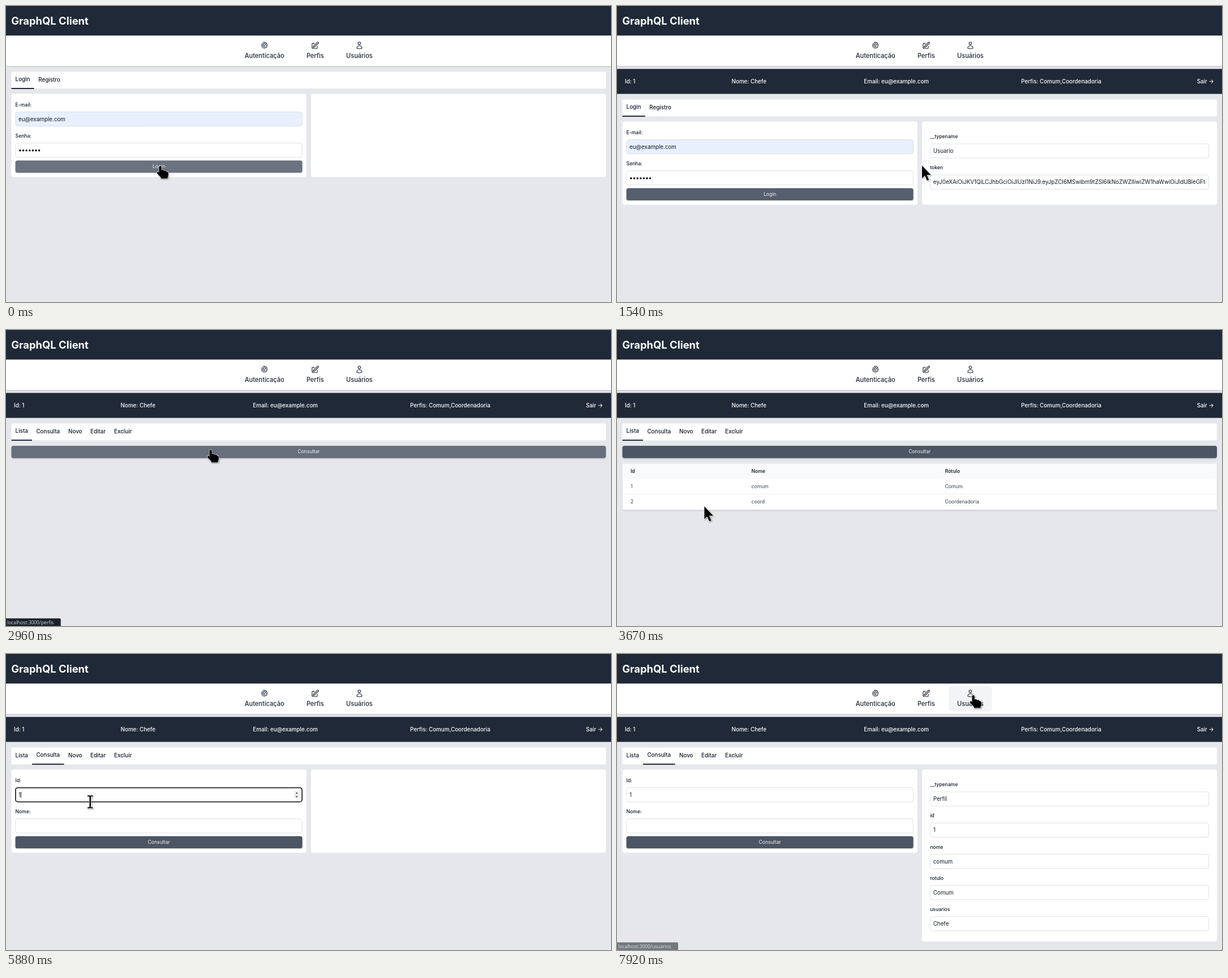
These frames come from a looping animation (1069x524 px, 8000 ms). An HTML page:

```html
<!DOCTYPE html>
<html lang="pt">
<head>
<meta charset="utf-8">
<style>
  html, body { margin: 0; width: 100%; height: 100%; overflow: hidden; background: #e5e7eb; }
  svg { display: block; width: 100%; height: 100%; }
  text { font-family: Inter, sans-serif; white-space: pre; }
  .shadow { filter: drop-shadow(0 1px 1.3px rgba(0, 0, 0, .2)); }
  .icon { fill: none; stroke: #1f2937; stroke-width: 1.9; stroke-linecap: round; stroke-linejoin: round; }
  .cursor { stroke: #fff; stroke-width: 1.4; stroke-linejoin: round; paint-order: stroke; filter: drop-shadow(1px 1.5px 1px rgba(0, 0, 0, .4)); }
</style>
</head>
<body>
<svg id="stage" viewBox="0 0 1069 524" preserveAspectRatio="none"></svg>
<script>
const LOOP = 8000, FPS = 24;
const SM = 8.58, BASE = 9.81, LG = 11.03, XL = 18.4;
const DARK = '#1f2937', INK = '#111827';
const EMAIL = 'eu@example.com', USER = 'Chefe', ROLE = 'Coordenadoria';
const TOKEN = 'eyJ0eXAiOiJKV1QiLCJhbGciOiJIUzI1NiJ9.eyJpZCI6MSwibm9tZSI6IkNoZWZlIiwiZW1haWwiOiJldUBleGFtcGxl';

const clamp = v => Math.max(0, Math.min(1, v));
const between = (t, a, b) => t >= a && t < b;
// Rises after a and falls after b, like a short CSS transition.
const fade = (t, a, b, d = 125) => clamp((t - a) / d) * (1 - clamp((t - b) / d));
const mix = (a, b, k) => `rgb(${a.map((v, i) => Math.round(v + (b[i] - v) * k))})`;

const rect = (x, y, w, h, fill, more = '') =>
  `<rect x="${x}" y="${y}" width="${w}" height="${h}" fill="${fill}" ${more}/>`;
const text = (x, y, s, size = BASE, fill = INK, weight = 400, anchor = 'start') =>
  `<text x="${x}" y="${y}" font-size="${size}" fill="${fill}" font-weight="${weight}" text-anchor="${anchor}">${s}</text>`;
const label = (x, y, s) => text(x, y, s, SM, INK, 500);
const panel = (x, h) => rect(x, 155.5, 521.3, h, '#fff', 'rx="3.7"');
const input = (x, y, w, value = '', fill = '#fff') =>
  rect(x, y, w, 25.2, fill, 'rx="3.7" stroke="#d1d5db" stroke-width=".7"') +
  `<svg x="${x + 5.3}" y="${y}" width="${w - 10.6}" height="25">${text(0, 16.3, value)}</svg>`;
const button = (x, y, w, s, hover) =>
  rect(x, y, w, 21.6, mix([75, 85, 99], [107, 114, 128], hover), 'rx="3.7" class="shadow"') +
  text(x + w / 2, y + 13.3, s, SM, '#f3f4f6', 400, 'middle');

const ICONS = [
  'M7.864 4.243A7.5 7.5 0 0 1 19.5 10.5c0 2.92-.556 5.709-1.568 8.268M5.742 6.364A7.465 7.465 0 0 0 4.5 10.5a7.464 7.464 0 0 1-1.15 3.993m1.989 3.559A11.209 11.209 0 0 0 8.25 10.5a3.75 3.75 0 1 1 7.5 0c0 .527-.021 1.049-.064 1.565M12 10.5a14.94 14.94 0 0 1-3.6 9.75m6.633-4.596a18.666 18.666 0 0 1-2.485 5.33',
  'M16.862 4.487l1.687-1.688a1.875 1.875 0 1 1 2.652 2.652L10.582 16.07a4.5 4.5 0 0 1-1.897 1.13L6 18l.8-2.685a4.5 4.5 0 0 1 1.13-1.897zM18 14v4.75A2.25 2.25 0 0 1 15.75 21H5.25A2.25 2.25 0 0 1 3 18.75V8.25A2.25 2.25 0 0 1 5.25 6H10',
  'M15.75 6a3.75 3.75 0 1 1-7.5 0 3.75 3.75 0 0 1 7.5 0ZM4.501 20.118a7.5 7.5 0 0 1 14.998 0A17.933 17.933 0 0 1 12 21.75c-2.676 0-5.216-.584-7.499-1.632Z'
];

function navItem(i, x, s, half, hover) {
  return rect(x - half, 57, half * 2, 44.2, '#f3f4f6', `rx="4.9" opacity="${hover}"`) +
    `<path class="icon" d="${ICONS[i]}" transform="translate(${x - 7.35} 62.4) scale(.613)"/>` +
    text(x, 92, s, LG, DARK, 500, 'middle');
}

function header(t) {
  return rect(0, 52, 1069, 54.3, '#fff', 'class="shadow"') + rect(0, 0, 1069, 52.3, DARK) +
    text(9.3, 33, 'GraphQL Client', XL, '#fff', 700) +
    navItem(0, 456.7, 'Autenticação', 50, 0) +
    navItem(1, 546.3, 'Perfis', 30.5, fade(t, 1830, 2800)) +
    navItem(2, 624.4, 'Usuários', 38.2, fade(t, 7740, LOOP));
}

function userBar() {
  const cells = [[14, 'Id: 1'], [202.6, 'Nome: ' + USER], [436.3, 'Email: ' + EMAIL],
    [714, 'Perfis: Comum,' + ROLE], [1024.7, 'Sair →']];
  return rect(0, 111.4, 1069, 44.2, DARK) +
    cells.map(([x, s]) => text(x, 136.7, s, BASE, '#fff', 500)).join('');
}

function tabs(items, active, x1, x2) {
  return rect(9.5, 116.5, 1050.5, 29.8, '#fff') + rect(x1, 145, x2 - x1, 2, DARK) +
    items.map(([x, s], i) => text(x, i === active ? 133.3 : 134.4, s, BASE, INK, 500)).join('');
}

function results(rows) {
  return rows.map(([name, value], i) =>
    label(553.2, 185.1 + i * 55.2, name) + input(553.4, 194.9 + i * 55.2, 492.2, value)).join('');
}

function form(first, second, fields, caption, hover) {
  return panel(9.5, 147.2) + label(16.6, 177.9, first) + label(16.6, 233.1, second) +
    fields + button(16.6, 273.4, 507, caption, hover);
}

function loginPage(t) {
  let dots = '';
  for (let i = 0; i < 7; i++) dots += `<circle cx="${24.9 + i * 5.62}" cy="255.8" r="1.75"/>`;
  const hover = t < 1200 ? 1 - clamp((t - 730) / 125) : fade(t, 1300, 1460);
  return tabs([[16.6, 'Login'], [57.2, 'Registro']], 0, 9.5, 49.6) +
    form('E-mail:', 'Senha:', input(16.8, 187.5, 506.6, EMAIL, '#e8f0fe') +
      input(16.8, 242.7, 506.6) + dots, 'Login', hover) +
    panel(538.8, 147.2) +
    (t >= 750 ? results([['__typename', 'Usuario'], ['token', TOKEN]]) : '');
}

const PROFILE_TABS = [[16.6, 'Lista'], [53.4, 'Consulta'], [110, 'Novo'], [149, 'Editar'], [191, 'Excluir']];

function table() {
  const cols = [24, 237.6, 579.4];
  const row = (y, cells, fill, weight) => cells.map((s, i) => text(cols[i], y, s, SM, fill, weight)).join('');
  return rect(9.5, 187.4, 1050.5, 82, '#fff', 'class="shadow"') +
    rect(9.5, 187.4, 1050.5, 27, '#f9fafb') + rect(9.5, 241.3, 1050.5, .7, '#e5e7eb') +
    row(203.6, ['Id', 'Nome', 'Rótulo'], DARK, 600) +
    row(230.9, ['1', 'comum', 'Comum'], '#374151') +
    row(258.1, ['2', 'coord', ROLE], '#374151');
}

function listPage(t) {
  return tabs(PROFILE_TABS, 0, 9.5, 46) +
    button(9.5, 156, 1050.5, 'Consultar', fade(t, 2850, 3300)) + (t >= 3200 ? table() : '');
}

function queryPage(t) {
  const typed = t >= 5400, done = t >= 6700;
  const focus = between(t, 4780, 6530) ?
    rect(16.9, 187.6, 506.2, 25, 'none', 'rx="3.9" stroke="#101010" stroke-width="1.6"') +
    rect(typed ? 26.1 : 22, 195, .8, 10.5, '#000') +
    rect(509, 193.5, 9.5, 13.5, '#efefef') +
    '<path d="M511.6 198.2l2.2-2.6 2.2 2.6zM511.6 202.6l2.2 2.6 2.2-2.6z" fill="#444"/>' : '';
  const fields = input(16.8, 187.5, 506.6, typed ? '1' : '') + input(16.8, 242.7, 506.6) + focus;
  return tabs(PROFILE_TABS, 1, 46, 102.6) +
    form('Id:', 'Nome:', fields, 'Consultar', fade(t, 6080, 7120)) +
    panel(538.8, done ? 304.3 : 147.2) +
    (done ? results([['__typename', 'Perfil'], ['id', '1'], ['nome', 'comum'], ['rotulo', 'Comum'], ['usuarios', USER]]) : '');
}

function statusBar(path, w, opacity) {
  return `<g opacity="${opacity}">` + rect(-4, 510.6, w + 4, 18, '#1d2329', 'rx="2"') +
    `<text x="2" y="520.9" font-size="8.4" fill="#c3d3de" style="font-family:'Noto Sans',sans-serif">localhost:3000/${path}</text></g>`;
}

function status(t) {
  if (between(t, 2120, 3110)) return statusBar('perfis', 96.7, t < 2280 || t > 3050 ? .57 : 1);
  return t >= 7870 ? statusBar('usuarios', 108, .57) : '';
}

const SHAPES = {
  arrow: 'M0 0V22.5L5 17.8L8.8 26.5L12.2 25L8.4 16.5H15.5Z',
  hand: 'M-2.6 3Q-2.6 .9-.4 .9Q1.8 .9 1.8 3V8.6Q3.4 7.7 5 8.4Q6.1 8.9 6.3 9.8Q8 8.9 9.5 9.8Q10.4 10.4 10.5 11.3Q13.5 10.8 13.8 13.8V17.6Q13.7 19.8 12.5 21.4V23.4H.6V21.4L-5.5 15Q-6.9 12.6-5.2 11.7Q-3.9 11.2-2.6 12.9Z',
  beam: 'M-4.6-11.6H-1.4L0-10.7L1.4-11.6H4.6V-9.4H1.2V9.4H4.6V11.6H1.4L0 10.7L-1.4 11.6H-4.6V9.4H-1.2V-9.4H-4.6Z'
};

// Pointer keys: time, x, y, shape from then on.
const PATH = [
  [0, 273, 282, 'hand'], [490, 273, 282, 'hand'], [500, 273, 283, 'hand'], [825, 273, 283, 'arrow'],
  [1220, 273, 283, 'arrow'], [1325, 322, 324, 'hand'], [1415, 450, 333, 'hand'], [1455, 492, 320, 'arrow'],
  [1541, 538.8, 283, 'arrow'], [1640, 562, 205, 'arrow'], [1790, 553, 106, 'arrow'], [1825, 551, 95, 'hand'],
  [2000, 546, 78, 'hand'], [2750, 546, 78, 'hand'], [2825, 500, 108, 'arrow'], [2910, 388, 205, 'hand'],
  [2958, 362, 211, 'hand'], [3260, 362, 211, 'hand'], [3320, 352, 235, 'arrow'], [3540, 272, 381, 'arrow'],
  [3660, 155, 313.5, 'arrow'], [3710, 150, 305, 'arrow'], [3910, 98, 193, 'hand'], [4000, 87, 171, 'hand'],
  [4500, 87, 171, 'hand'], [4600, 98, 196, 'arrow'], [4710, 125, 238, 'beam'], [4830, 139, 258, 'beam'],
  [4995, 139, 258, ''], [5870, 146.3, 260.3, 'beam'], [5960, 190, 286, 'arrow'], [6080, 249, 318, 'hand'],
  [6120, 252, 321, 'hand'], [6250, 252, 321, 'hand'], [6370, 255, 332, 'hand'], [7090, 255, 332, 'hand'],
  [7160, 275, 345, 'arrow'], [7245, 321, 365, 'arrow'], [7320, 330, 357, 'arrow'], [7700, 606, 104, 'arrow'],
  [7740, 616, 92, 'hand'], [7830, 630, 72, 'hand'], [LOOP, 630, 72, 'hand']
];

function pointer(t) {
  const i = PATH.findIndex(key => key[0] > t) - 1;
  const [t0, x0, y0, shape] = PATH[i], [t1, x1, y1] = PATH[i + 1];
  if (!shape) return '';
  const k = (t - t0) / (t1 - t0);
  return `<path class="cursor" d="${SHAPES[shape]}" transform="translate(${x0 + (x1 - x0) * k} ${y0 + (y1 - y0) * k})"/>`;
}

function scene(t) {
  const page = t < 2280 ? loginPage : t < 4280 ? listPage : queryPage;
  const logged = t >= 745;
  return header(t) + (logged ? userBar() : '') +
    `<g transform="translate(0 ${logged ? 49.1 : 0})">${page(t)}</g>` + status(t) + pointer(t);
}

const stage = document.getElementById('stage');
let start = null, shown = -1;
function draw(now) {
  if (start === null) start = now;
  const tick = Math.floor(((now - start) % LOOP + 5) * FPS / 1000) % (LOOP * FPS / 1000);
  if (tick !== shown) {
    shown = tick;
    stage.innerHTML = scene(tick * 1000 / FPS);
  }
  requestAnimationFrame(draw);
}
requestAnimationFrame(draw);
</script>
</body>
</html>
```
